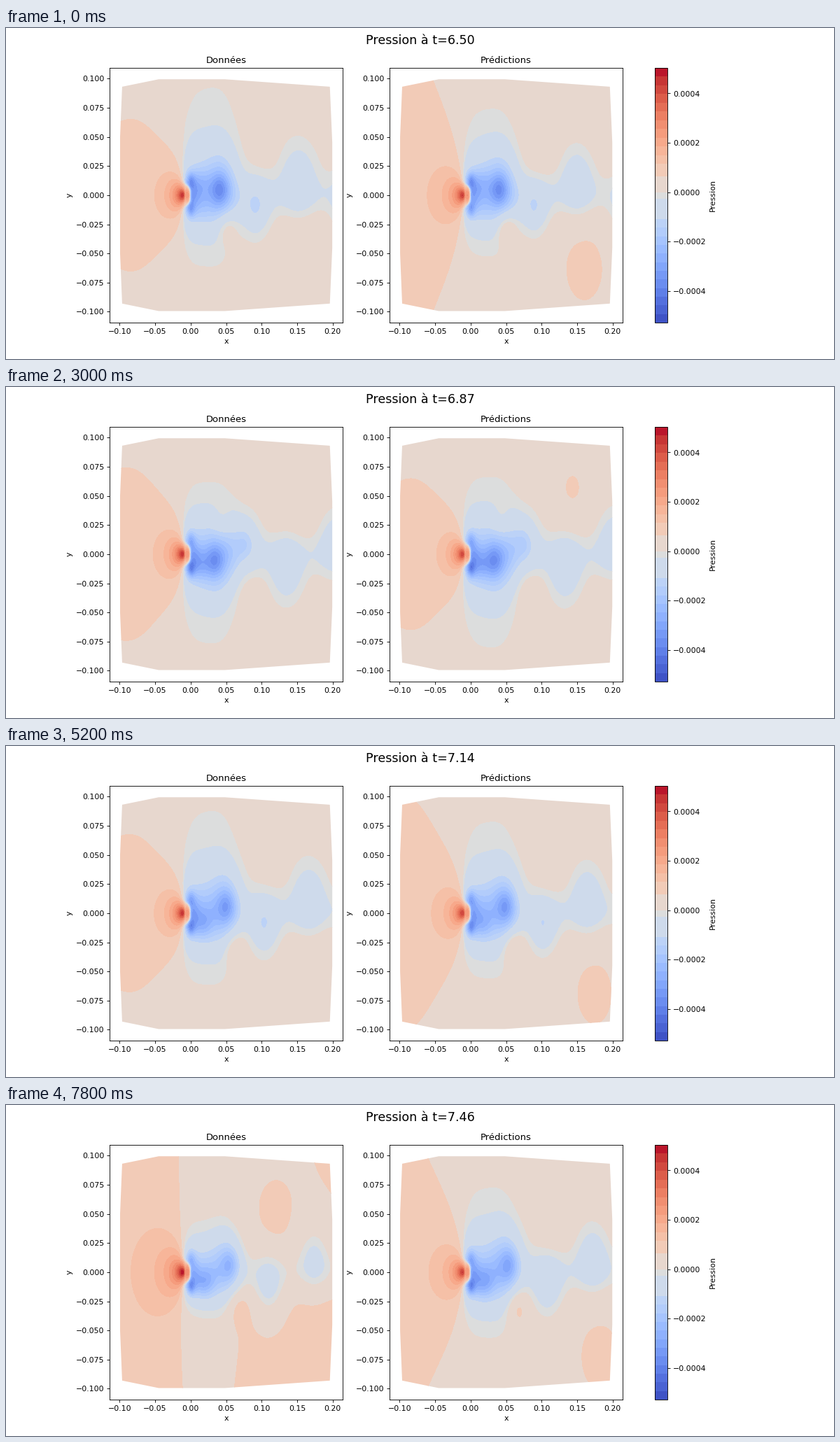
A matplotlib script that plays this animation: 1183x473 px, repeating every 8000 ms.

```python
import numpy as np
import matplotlib.pyplot as plt
from matplotlib.animation import FuncAnimation
from matplotlib.cm import ScalarMappable
from matplotlib.colors import BoundaryNorm, ListedColormap
from matplotlib.patches import Polygon

WIDTH, HEIGHT, DPI = 1183, 473, 79
FRAMES, INTERVAL = 40, 200
T0, DT = 6.504, 0.0244
SHED = 0.158            # shedding cycles per frame
KEYS = [0, 5, 8, 15, 22, 31, 39]
DATA_LEVEL = [0.25, 0.70, 0.24, 0.29, 0.23, 0.30, 0.67]
PRED_LEVEL = [0.49, 0.53, 0.30, 0.28, 0.50, 0.29, 0.46]

# Pressures are in 1e-4, lengths in 1e-2.
LOW, HIGH = -5.27, 5.04
LEVELS = np.r_[np.linspace(LOW, -1.08, 13), -0.25, 0, 0.65,
               np.linspace(1.15, HIGH, 12)]
mids = (LEVELS[:-1] + LEVELS[1:]) / 2
cmap = ListedColormap(plt.get_cmap("coolwarm")((mids - LOW) / (HIGH - LOW)))
norm = BoundaryNorm(LEVELS * 1e-4, cmap.N)

xs = np.r_[np.linspace(-9.94, -2, 70), np.linspace(-1.95, 1, 80),
           np.linspace(1.1, 19.94, 150)]
ys = np.r_[np.linspace(-9.94, -2.1, 65), np.linspace(-2, 2, 70),
           np.linspace(2.1, 9.94, 65)]
X, Y = np.meshgrid(xs, ys)

HALF = [(-9.94, 5), (-9.65, 9.3), (-4.5, 9.94), (4.8, 9.94),
        (19.6, 9.3), (19.94, 4.5)]
OUTLINE = np.array(HALF + [(x, -y) for x, y in HALF[::-1]]) / 100


def bump(x, y, sx, sy):
    return np.exp(-((X - x) / sx) ** 2 / 2 - ((Y - y) / sy) ** 2 / 2)


def sigmoid(v):
    return 1 / (1 + np.exp(-np.clip(v, -40, 40)))


def ramp(v, a, b):
    u = np.clip((v - a) / (b - a), 0, 1)
    return u * u * (3 - 2 * u)


# Parts of the field that stay still
edge = -1.15 + 1.05 * np.exp(-(Y / 0.95) ** 4)
BEHIND = sigmoid((X - edge) / (0.04 + 0.09 * np.abs(Y)))
ahead = np.maximum(-0.8 - X, 0)
FRONT = ahead / (ahead ** 2 + Y ** 2 + 0.22)
NOSE = (1 - BEHIND) * bump(-0.5, 0, 0.4, 0.55)
WAKE = BEHIND * np.exp(-((X - 2) / 4.5) ** 4) / (1 + Y ** 2 / 8.5)
BASE = BEHIND * bump(0.3, 0, 0.7, 1.0)
TRAIL = 0.34 * sigmoid((X - 5) / 1.2) * np.exp(-(Y / 1.7) ** 2)
LIFT = BEHIND * Y / (Y ** 2 + 16)
INFLOW = sigmoid(-(X + 5) / 1.2)


def vortex_x(s):
    return 4.1 + (5.2 * s if s < 0 else 9 * s + 2.1 * s * s)


def vortices(phase, gain):
    """Sum of the shed vortices and the high pressure facing each one."""
    p = np.zeros_like(X)
    for n in range(-4, 15):
        s = phase - n / 2
        if not -0.6 < s < 1.7:
            continue
        side = 1 if n % 2 == 0 else -1
        x = vortex_x(s)
        y = side * (0.5 + min(1.4 * s, 0.7) if s > 0 else 0.5 - s)
        late = max(s, 0)
        wide = ramp(s, -0.5, 0) * (0.97 - 0.08 * late)
        core = 1.2 * ramp(s, -0.6, -0.2) * np.exp(-late / 0.42)
        feed = ramp(s, -0.6, -0.25) * (1 - ramp(s, -0.1, 0.2))
        p -= BEHIND * wide * bump(x, side * (0.8 + 0.4 * ramp(s, 0, 0.5)),
                                  1.75, 2.1)
        p -= BEHIND * core * bump(x, y, 0.9, 0.95)
        p -= BEHIND * feed * bump(1.2, side, 1.0, 0.9)
        rise = (gain + 0.5 * np.exp(-(s / 0.22) ** 2)) * ramp(s, -0.35, 0)
        size = 1 + 1.3 * late ** 2
        p += rise * bump(x + 1, -side * (2.7 + 1.8 * late + 2 * late ** 2),
                         size, size * 1.1)
    return p


def pressure(k, level, predicted):
    phase = SHED * k - (0.015 if predicted else 0)
    swing = np.cos(2 * np.pi * (phase - 0.03))
    ambient = np.interp(k, KEYS, level)
    inflow = 0.3 * (0.7 - ambient) * INFLOW
    if predicted:
        calm = 0.25 + 0.4 * (ambient - 0.25)
        ambient = ambient + (calm - ambient) * sigmoid((X + 1.5) / 0.8)
    p = ambient + inflow + (3.3 if predicted else 3.6) * FRONT + 2.2 * NOSE
    p = p - 1.9 * WAKE - 1.1 * BASE - TRAIL - 0.9 * swing * LIFT
    # Suction at the two shoulders of the cylinder
    for side in (1, -1):
        strength = 1.4 + 0.5 * side * np.cos(2 * np.pi * (phase + 0.25))
        p = p - strength * BEHIND * bump(0, 1.25 * side, 0.45, 0.5)
    p = p + vortices(phase, 0.38 if predicted else 0.2)
    return np.clip(p, LOW + 0.01, HIGH - 0.01) * 1e-4


plt.rcParams["font.family"] = "DejaVu Sans"
# The small margin keeps the pixel size from rounding down.
fig, axes = plt.subplots(
    1, 2, dpi=DPI, figsize=((WIDTH + 0.01) / DPI, (HEIGHT + 0.01) / DPI))
title = fig.suptitle("", fontsize=16)
panels = []
for ax, name, level in zip(axes, ("Données", "Prédictions"),
                           (DATA_LEVEL, PRED_LEVEL)):
    ax.set(title=name, xlabel="x", ylabel="y",
           xlim=(-0.1143, 0.2143), ylim=(-0.1093, 0.1093))
    panels.append((ax, level, name != "Données"))

bar = fig.colorbar(ScalarMappable(norm, cmap), ax=axes, label="Pression",
                   spacing="proportional", ticks=np.arange(-4, 5, 2) * 1e-4,
                   format="{x:.4f}")
bar.minorticks_off()
drawn = []


def update(k):
    while drawn:
        drawn.pop().remove()
    title.set_text(f"Pression à t={T0 + DT * k:.2f}")
    for ax, level, predicted in panels:
        field = ax.contourf(X / 100, Y / 100, pressure(k, level, predicted),
                            levels=LEVELS * 1e-4, cmap=cmap, norm=norm)
        field.set_clip_path(Polygon(OUTLINE, transform=ax.transData))
        drawn.append(field)
    return drawn


anim = FuncAnimation(fig, update, frames=FRAMES, interval=INTERVAL,
                     init_func=lambda: [], repeat=True, repeat_delay=0)
plt.show()
```
